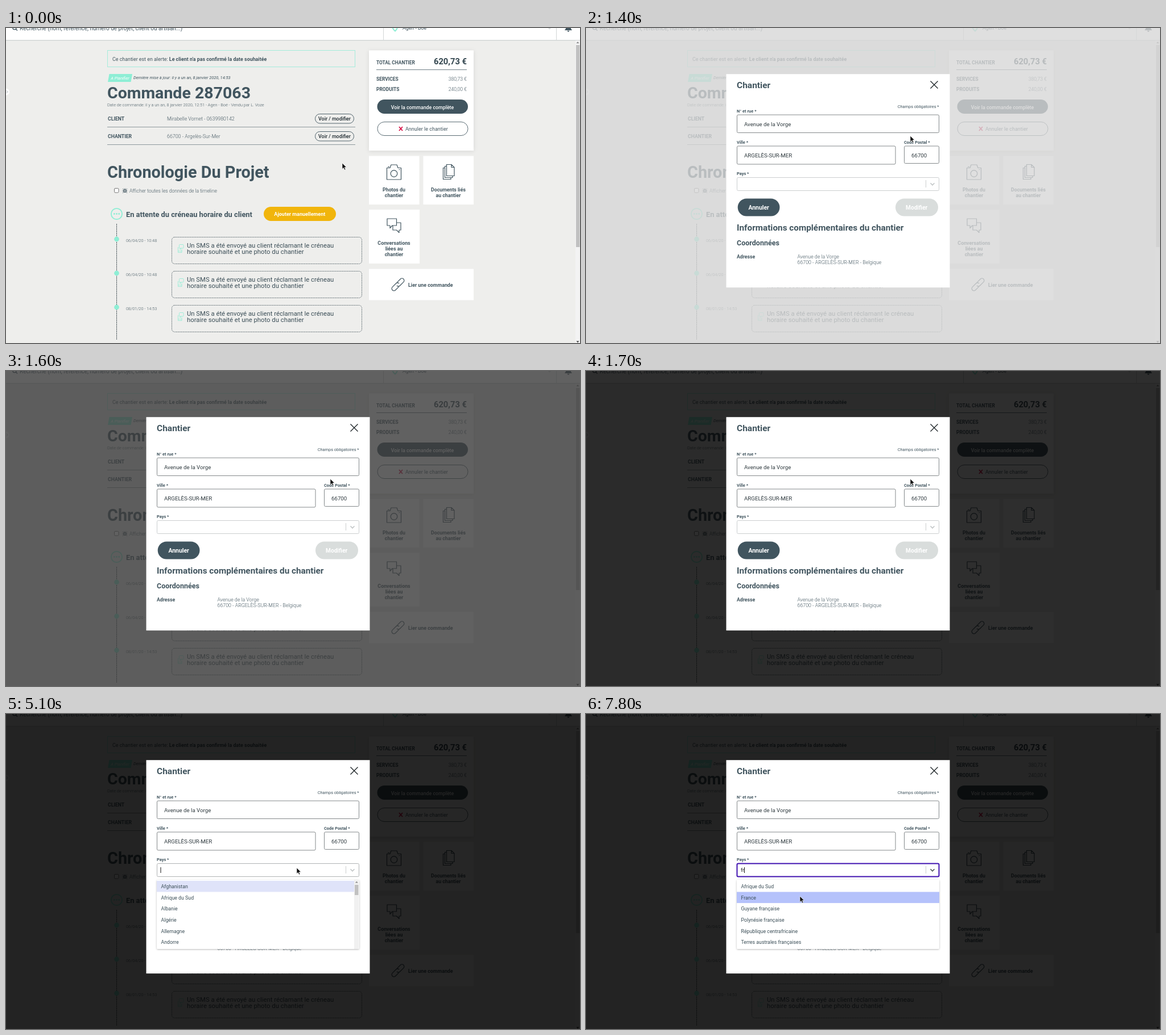
An HTML page for the animation above (8 s loop, 1009 by 555 pixels).

```html
<!DOCTYPE html>
<html lang="fr">
<head>
<meta charset="utf-8">
<title>Chantier</title>
<style>
  html, body { margin: 0; width: 100%; height: 100%; overflow: hidden; background: #eeeeec; }
  svg { display: block; width: 1009px; height: 555px; }
  text { font-family: Roboto, "Liberation Sans", sans-serif; white-space: pre; }
</style>
</head>
<body>
<svg id="stage" viewBox="0 0 1009 555" xmlns="http://www.w3.org/2000/svg"></svg>
<script>
const INK = '#41555f', TEAL = '#8eeed5', PURPLE = '#4012b0', PAPER = '#eeeeec';
const LOOP = 8000;

// Drawing helpers
const text = (x, y, str, size, weight = 400, fill = INK, more = '') =>
  `<text x="${x}" y="${y}" font-size="${size}" font-weight="${weight}" fill="${fill}" ${more}>${str}</text>`;
const mid = 'text-anchor="middle"', end = 'text-anchor="end"';
const box = (x, y, w, h, fill = '#fff', stroke = 'none', rx = 0, more = '') =>
  `<rect x="${x}" y="${y}" width="${w}" height="${h}" rx="${rx}" fill="${fill}" stroke="${stroke}" ${more}/>`;
const path = (d, stroke = INK, width = 1, more = '') =>
  `<path d="${d}" fill="none" stroke="${stroke}" stroke-width="${width}" ${more}/>`;
const dot = (x, y, r, fill, more = '') => `<circle cx="${x}" cy="${y}" r="${r}" fill="${fill}" ${more}/>`;
const at = (x, y, inner) => `<g transform="translate(${x} ${y})">${inner}</g>`;
const lines = (x, y, step, list, ...style) => list.map((s, i) => text(x, y + i * step, s, ...style)).join('');

function header() {
  return box(0, 0, 1009, 21, '#fff') + path('M0 21.5H1009', '#cfd2d2') + path('M0 22.5H1009', '#e4e6e5') +
    path('M663.5 0V21M967.5 0V21', '#d3d6d6') +
    dot(15, -.5, 3.2, 'none', `stroke="${INK}" stroke-width="1.3"`) + path('M17 1.8L20 4.6', INK, 1.4) +
    text(24, 4, 'Recherche (nom, référence, numéro de projet, client ou artisan...)', 10) +
    path('M679.5 -2C679.5 2 684 5.5 684 5.5S688 2 688 -2', TEAL, 2) +
    text(697, 3.3, 'Agen - Boé', 8.8) +
    path('M953 -1L955.5 2L958 -1', '#b9bfc1') +
    '<path d="M984 -4H993L993 1L995 4H982L984 1ZM986.5 4.8H990.5Q990 6.8 988.5 6.8T986.5 4.8Z" fill="#41555f"/>';
}

function scrollbar() {
  return box(1001, 22, 8, 533, '#f3f3f3') + box(1002, 30, 6.5, 356, '#c1c1c1') +
    '<path d="M1002.5 27H1007.5L1005 24Z" fill="#8a8a8a"/><path d="M1002.5 551.5H1007.5L1005 554.5Z" fill="#444"/>';
}

function order() {
  const row = (y, label, value) =>
    text(179, y + 3.3, label, 8.7, 700) + text(283, y + 3.3, value, 8.85, 300) +
    box(543.5, y - 8.5, 68, 16.5, 'none', INK, 8.2, 'stroke-width=".9"') +
    text(577.5, y + 3, 'Voir / modifier', 8.85, 500, '#1f2a30', mid) +
    path(`M178 ${y + 14.5}H614`, '#8e999d');
  return box(178.5, 39.5, 435, 29, 'none', '#a4ecdb') +
    text(187, 57.8, 'Ce chantier est en alerte: <tspan font-weight="700">Le client n\'a pas confirmé la date souhaitée</tspan>', 8.87) +
    `<path d="M181.5 81H222L219.5 95H179Z" fill="${TEAL}"/>` +
    text(200.5, 90.5, 'A Planifier', 7.4, 400, '#fff', 'font-style="italic" ' + mid) +
    text(224, 90, 'Dernière mise à jour: il y a un an, 8 janvier 2020, 14:53', 7.42, 400, INK, 'font-style="italic"') +
    text(178, 123.7, 'Commande 287063', 28.5, 700) +
    text(178, 138.3, 'Date de commande: il y a un an, 8 janvier 2020, 12:51 - Agen - Boé - Vendu par L. Voze', 7.42, 300) +
    row(160, 'CLIENT', 'Mirabelle Vornet - 0639980142') +
    row(191, 'CHANTIER', '66700 - Argelès-Sur-Mer');
}

function event(y, date) {
  return dot(194.5, y + 4, 4.4, TEAL) + text(211, y + 9, date, 7.42, 300) +
    box(291.5, y + .5, 334, 47, 'none', '#5d6a70', 5, 'stroke-width=".9" stroke-dasharray="2 1"') +
    at(302, y + 13, box(2.5, .5, 7.5, 6.5, 'none', TEAL, 1, 'stroke-width=".8"') +
      path('M.5 5V14.5H7V9M.5 12H7M4 7V9.5L6.5 7', TEAL, .8)) +
    lines(318, y + 19, 11, ['Un SMS a été envoyé au client réclamant le créneau', 'horaire souhaité et une photo du chantier'], 11.3, 400, '#3b4e57');
}

function timeline() {
  const bug = dot(0, .5, 2.6, 'none', `stroke="${INK}"`) +
    path('M-4.5 .5H4.5M-4 -3.5L-2 -1.2M4 -3.5L2 -1.2M-4 4.5L-2 2.2M4 4.5L2 2.2M0 -2V3M-1.5 -4L0 -2L1.5 -4', INK, .7);
  return text(178, 264.2, 'Chronologie Du Projet', 28.85, 700) +
    box(190.5, 282.5, 7.5, 7.5, '#fff', '#767676', 1.5) + at(209, 286.5, bug) +
    text(217, 290, 'Afficher toutes les données de la timeline', 8.6, 300) +
    path('M194.5 345V549', '#3c484e', 1, 'stroke-dasharray="2.2 1"') +
    dot(194.5, 327.5, 9.6, 'none', `stroke="${TEAL}" stroke-width="1.8"`) +
    [-4.2, 0, 4.2].map(d => dot(194.5 + d, 327.5, 1.4, TEAL)).join('') +
    text(211, 332.8, 'En attente du créneau horaire du client', 12.8, 700) +
    box(453, 315, 127, 25, '#f1b50c', 'none', 12.5) +
    text(516.3, 331, 'Ajouter manuellement', 9, 700, '#fff', mid) +
    event(368, '06/04/20 - 10:48') + event(428, '06/04/20 - 10:48') + event(488, '08/01/20 - 14:53');
}

function sidebar() {
  const price = (y, label, value) => text(651, y, label, 8.45, 700) + text(810, y, value, 8.6, 300, INK, end);
  const camera = path('M-12.5 -7.5H-7L-5 -13H5L7 -7.5H12.5V13H-12.5Z', INK, 1.2, 'stroke-linejoin="round"') +
    dot(0, 2.5, 5.8, 'none', `stroke="${INK}" stroke-width="1.2"`) + path('M8.5 -4.5H10.5M-11 -9.5H-8', INK, 1.1);
  const docs = path('M-3.5 -13H5L10 -8V7H-3.5ZM5 -13V-8H10M-3.5 -10H-6.5V10H7V7M-6.5 -7H-9.5V13H4V10', INK, 1.2);
  const chat = path('M-12 -12H4.5V0H-3L-7 4.5V0H-12ZM4.5 -5H12V8H9V12.5L4.5 8H-2V0', INK, 1.2, 'stroke-linejoin="round"');
  const link = '<g transform="rotate(-45)">' +
    path('M-1 3.8H-10A3.8 3.8 0 0 1 -10 -3.8H-1A3.8 3.8 0 0 1 2.8 0M1 -3.8H10A3.8 3.8 0 0 1 10 3.8H1A3.8 3.8 0 0 1 -2.8 0', INK, 1.2) + '</g>';
  const tile = (x, y, w, h) => box(x, y, w, h, '#fff');
  return box(638, 39.5, 184, 176.5, '#fff', 'none', 0, 'filter="url(#soft)"') +
    text(651, 64, 'TOTAL CHANTIER', 8.35, 700) + text(810, 63.6, '620,73 €', 14.75, 700, '#33464f', end) +
    path('M651 73.5H810', '#6f7f86') + price(93, 'SERVICES', '380,73 €') + price(111, 'PRODUITS', '240,00 €') +
    box(652.5, 126, 159.5, 25, INK, 'none', 12.5) + text(732, 142.5, 'Voir la commande complète', 8.8, 500, '#fff', mid) +
    box(653, 165.5, 159, 24, '#fff', '#5b6c74', 12) + path('M691 174L697 181M697 174L691 181', '#d8174a', 1.9) +
    text(702, 180.8, 'Annuler le chantier', 9) +
    tile(638, 225.5, 88.5, 85.5) + tile(733.5, 225.5, 88.5, 85.5) + tile(638, 320, 89, 95) + tile(638, 424.5, 184, 55) +
    at(682, 254, camera) + at(778, 253.5, docs) + at(682, 348, chat) + at(689, 452, link) +
    lines(682, 288, 10, ['Photos du', 'chantier'], 8.75, 700, INK, mid) +
    lines(777.5, 288, 10, ['Documents liés', 'au chantier'], 8.75, 700, INK, mid) +
    lines(682, 382, 10, ['Conversations', 'liées au', 'chantier'], 8.85, 700, INK, mid) +
    text(707, 455.7, 'Lier une commande', 8.85, 700);
}

function modal() {
  const field = (x, y, w, h, value) =>
    box(x + .5, y + .5, w, h, '#fff', '#84898b', 2) + text(x + 13, y + 20.6, value, 9.7, 400, '#2f3a3f');
  return box(246.5, 81.2, 393, 376) +
    text(265, 106, 'Chantier', 15.5, 700) + path('M605.5 93.5L618.5 106.5M618.5 93.5L605.5 106.5', '#1e2528', 1.4) +
    text(620.5, 141, 'Champs obligatoires *', 7.4, 400, INK, end) +
    text(265, 148.7, 'N° et rue *', 7.45, 700) + field(265, 152.5, 355, 31.5, 'Avenue de la Vorge') +
    text(265, 203.7, 'Ville *', 7.45, 700) + field(265, 207.5, 278.5, 32, 'ARGELÈS-SUR-MER') +
    field(559, 207.5, 61, 30.5, '66700') + text(559, 203.7, 'Code Postal *', 7.45, 700) +
    text(265, 258.7, 'Pays *', 7.45, 700) +
    box(266.7, 300.5, 73.8, 31, INK, 'none', 15.5) + text(303.7, 320, 'Annuler', 10.4, 700, '#fff', mid) +
    box(544, 300.5, 75, 31, '#d9dddc', 'none', 15.5) + text(581.2, 320, 'Modifier', 10.1, 700, '#fff', mid) +
    text(265, 357, 'Informations complémentaires du chantier', 15.3, 700) +
    text(265, 383.3, 'Coordonnées', 12.5, 700) + text(265, 406, 'Adresse', 8.7, 700) +
    lines(371.5, 406, 10, ['Avenue de la Vorge', '66700 - ARGELÈS-SUR-MER - Belgique'], 8.8, 300) +
    '<g id="select"></g><g id="menu"></g>';
}

const POINTERS = {
  arrow: '<path d="M0 0V10.4L2.4 8.2L4.1 12L5.9 11.2L4.2 7.5H7.5Z" fill="#111" stroke="#fff" stroke-width=".6"/>',
  hand: '<path d="M0 1Q0 -.3 1 -.3T2 1V5L7.5 6Q8.3 6.4 8.2 8L7.5 12.5H1L-2.8 7.8Q-2.4 6.4 -1.2 7.2L0 8.2Z" fill="#fff" stroke="#111" stroke-width=".9"/>',
  beam: path('M-2.5 -7.5H-.7L0 -6.8L.7 -7.5H2.5M0 -6.8V6.8M-2.5 7.5H-.7L0 6.8L.7 7.5H2.5', '#111', 1)
};

// time, x, y, pointer shape
const MOVES = [
  [0, 591, 238, 'arrow'], [500, 590, 233, 'arrow'], [600, 586, 222, 'arrow'], [700, 580, 208, 'arrow'],
  [800, 574, 197, 'hand'], [900, 571, 189, 'hand'], [1000, 570, 186, 'hand'], [1400, 570, 190, 'arrow'],
  [2000, 569.5, 194, 'beam'], [2200, 500, 225, 'beam'], [2300, 431, 253, 'arrow'],
  [2500, 440, 262, 'arrow'], [2600, 462, 270, 'arrow'], [2700, 474, 273, 'arrow'],
  [3000, 482, 300, 'arrow'], [3100, 488, 365, 'arrow'], [3200, 486, 409, 'arrow'],
  [3400, 476, 411, 'arrow'], [3500, 484, 422, 'arrow'], [3600, 504, 426, 'arrow'], [3700, 524, 421, 'arrow'],
  [3800, 533, 410, 'arrow'], [3900, 529, 397, 'arrow'], [4000, 514, 389, 'arrow'], [4100, 500, 386, 'arrow'],
  [4200, 496, 386, 'arrow'], [4500, 500, 350, 'arrow'], [4600, 507, 300, 'arrow'], [4700, 511, 276, 'arrow'],
  [4900, 511, 271, 'arrow'], [7200, 505, 277, 'arrow'], [7300, 482, 291, 'arrow'], [7400, 450, 304, 'arrow'],
  [7500, 418, 314, 'arrow'], [7600, 394, 320, 'arrow'], [7700, 380, 321, 'arrow'], [7800, 376, 321, 'arrow']
];
// time, grey level, opacity of the backdrop
const SHADES = [[1400, 215, .8], [1500, 136, .8], [1600, 58, .8], [1700, 4, .83], [1800, 0, .85]];
const LISTS = [
  [5100, '', ['Afghanistan', 'Afrique du Sud', 'Albanie', 'Algérie', 'Allemagne', 'Andorre'], 18],
  [6400, 'f', ['Afghanistan', 'Afrique du Sud', 'Burkina Faso', 'Fidji', 'Finlande', 'France'], 44],
  [6700, 'fr', ['Afrique du Sud', 'France', 'Guyane française', 'Polynésie française', 'République centrafricaine', 'Terres australes françaises'], 0]
];
const CARET_X = { '': 272, f: 275.3, fr: 278.5 };
const current = (table, t) => table.filter(step => step[0] <= t).pop();

function select(t, typed, y) {
  const focus = t >= 5200, open = t >= 5100, hover = y > 262 && y < 287;
  const border = focus ? (t < 5400 ? '#6b49c4' : PURPLE) : hover ? '#b0b3b4' : '#cbcecf';
  const caret = open && (t < 5200 || Math.floor((t - 5200) / 600) % 2 === 0);
  return box(265.5, 263.5, 355, 23, '#fff', border, 2, `stroke-width="${focus ? 2 : 1}"`) +
    path('M597.5 268V281', '#cccfd0') +
    path('M605.5 273.2L609 276.8L612.5 273.2', focus ? '#4d5558' : '#c2c6c7', 1.6) +
    text(272, 278, typed, 8.85, 400, '#222') +
    (caret ? path(`M${CARET_X[typed]} 270V280`, '#111') : '');
}

function menu(t, options, thumb) {
  const pitch = 19.65, active = t >= 7500 ? 1 : 0, width = thumb ? 347 : 356;
  return box(265, 292, 356, 122, '#fff', 'none', 2, 'filter="url(#lift)"') +
    box(265, 293.8 + active * pitch, width, pitch, t < 5200 ? '#dfe3f9' : '#b5c2fb') +
    lines(272.5, 307, pitch, options, 8.8, 400, '#3b4e57') +
    (thumb ? box(612, 292, 8.5, 122, '#f1f1f1') + box(613, 301, 6.5, thumb, '#c1c1c1') +
      '<path d="M613.8 297.5H618.8L616.3 294.8Z" fill="#8a8a8a"/>' : '');
}

const shadow = (id, dy, blur, alpha) =>
  `<filter id="${id}" x="-10%" y="-10%" width="120%" height="125%"><feDropShadow dx="0" dy="${dy}" stdDeviation="${blur}" flood-opacity="${alpha}"/></filter>`;

document.getElementById('stage').innerHTML =
  `<defs>${shadow('soft', 1, 3.5, .1)}${shadow('lift', 1, 1.5, .28)}</defs>` +
  box(0, 0, 1009, 555, PAPER) + header() + scrollbar() +
  dot(0, 112.5, 6, '#fff') + path('M1 110.5L3 112.5L1 114.5', '#9aa5a9') +
  order() + timeline() + sidebar() +
  `<g id="dialog">${box(0, 0, 1009, 555, '#000', 'none', 0, 'id="shade"')}${modal()}</g><g id="pointer"></g>`;

const el = id => document.getElementById(id);
const put = (node, html) => { if (node.cache !== html) node.innerHTML = node.cache = html; };

function draw(now) {
  const t = now % LOOP;
  const [, x, y, shape] = current(MOVES, t);
  const shade = current(SHADES, t);
  const list = current(LISTS, t);
  el('dialog').style.display = shade ? '' : 'none';
  if (shade) {
    const [, grey, alpha] = shade;
    el('shade').setAttribute('fill', `rgba(${grey},${grey},${grey},${alpha})`);
  }
  put(el('select'), select(t, list ? list[1] : '', y));
  put(el('menu'), list ? menu(t, list[2], list[3]) : '');
  put(el('pointer'), at(x, y, POINTERS[shape]));
}

const start = performance.now();
function tick() {
  draw(performance.now() - start);
  requestAnimationFrame(tick);
}
tick();
</script>
</body>
</html>
```
